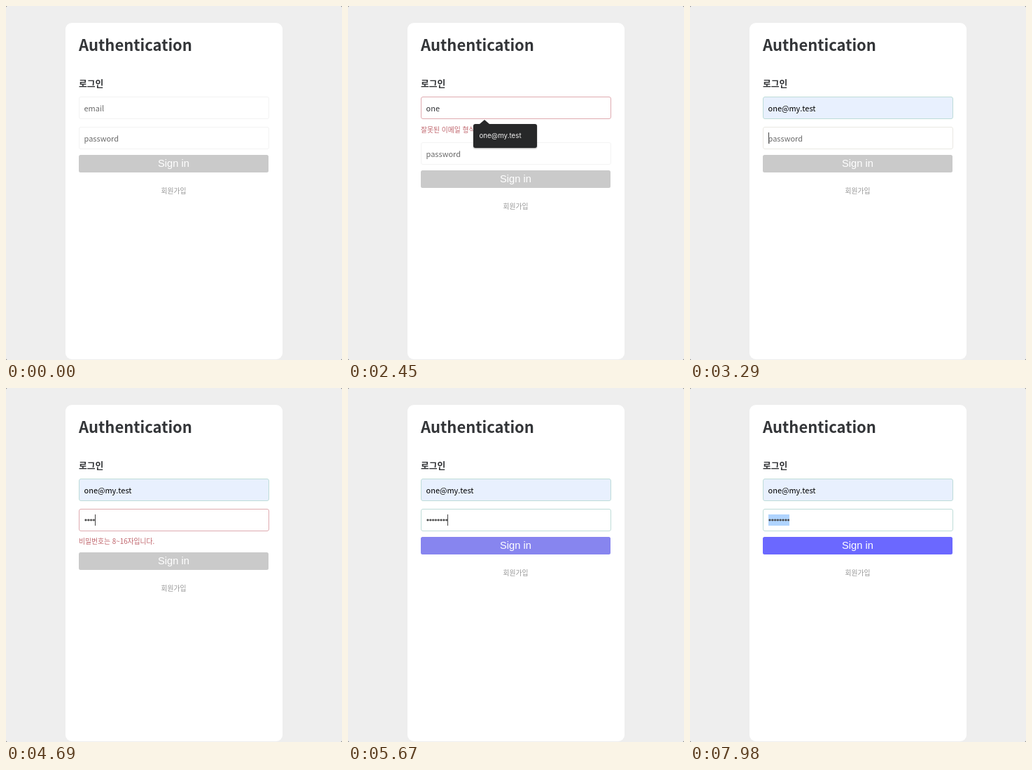
Write an HTML page that moves like this. It is 480 px wide and 504 px high and loops after 8 s.

```html
<!DOCTYPE html>
<html lang="ko">
<head>
<meta charset="utf-8">
<title>Authentication</title>
<style>
  html, body { margin: 0; width: 100%; height: 100%; overflow: hidden; background: #555; }
  .stage {
    position: relative; width: 480px; height: 504px; overflow: hidden;
    background: #eee; border-radius: 2px;
    font: 11px "Noto Sans CJK KR", "Noto Sans CJK", sans-serif; color: #333538;
  }
  .stage > *, .lower > * { position: absolute; box-sizing: border-box; white-space: pre; }
  .card { left: 84.5px; top: 24px; width: 310.5px; height: 478.5px; border-radius: 9px; background: #fff; }
  h1 { margin: 0; left: 104px; top: 38.4px; font-size: 22px; line-height: 32px; }
  h2 { margin: 0; left: 104px; top: 99.5px; font-size: 12.83px; line-height: 20px; }
  .lower { left: 0; top: 0; width: 480px; height: 0; }

  .field {
    display: flex; align-items: center; left: 104px; width: 272px; height: 32px;
    padding: 0 6.5px; border: 1px solid; border-radius: 3px; background: #fff;
  }
  #email { top: 129px; }
  #password { top: 172px; }
  .faint { border-color: #f3f3f3; }
  .plain { border-color: #e9e8e3; }
  .bad { border-color: #dfabb0; }
  .good { border-color: #bedcd8; }
  .filled { background: #e8f0fe; color: #000; }
  .hint { color: #6b6b6b; }
  .caret { width: 1px; height: 16px; margin-right: -1px; background: #444; }
  .dots {
    height: 16px;
    background: radial-gradient(circle, #444 1.2px, transparent 1.8px) 0 0 / 3.83px 16px repeat-x;
  }
  .dots.selected { background-color: #b0d4fe; }

  .error { left: 104px; font-size: 9.8px; line-height: 16px; color: #bf636a; }
  #emailError { top: 167.5px; }
  #passwordError { top: 210px; }
  #button {
    left: 104px; top: 212px; width: 271px; height: 25px; border-radius: 2.5px;
    font: 14.67px/25px "Liberation Sans", Arial, sans-serif; text-align: center; color: #fff;
  }
  .link { left: 104px; top: 255px; width: 271px; text-align: center; font-size: 9.8px; line-height: 16px; color: #969696; }

  #popup {
    left: 179px; top: 168px; width: 90.5px; height: 33.5px; padding: 4px 0; border-radius: 3px;
    background: #272829; box-shadow: 0 1px 2px rgba(0, 0, 0, .35);
    font: 9.75px/26px Inter, Roboto, sans-serif; color: #f2f2f2;
  }
  #popup::before {
    content: ""; position: absolute; left: 8.5px; top: -6px;
    border: 7.5px solid transparent; border-top: 0; border-bottom: 6.5px solid #272829;
  }
  #item { padding-left: 8.5px; }
  #item.hover { background: #434446; }
</style>
</head>
<body>
<div class="stage">
  <div class="card"></div>
  <h1>Authentication</h1>
  <h2>로그인</h2>
  <div id="email" class="field"><span class="value"></span><i class="caret"></i><span class="hint">email</span></div>
  <div id="emailError" class="error">잘못된 이메일 형식입니다.</div>
  <div class="lower" id="passwordRow">
    <div id="password" class="field"><span class="value dots"></span><i class="caret"></i><span class="hint">password</span></div>
    <div id="passwordError" class="error">비밀번호는 8~16자입니다.</div>
  </div>
  <div class="lower" id="actions">
    <div id="button">Sign in</div>
    <div class="link">회원가입</div>
  </div>
  <div id="popup"><div id="item"></div></div>
</div>
<script>
const LOOP = 8000, SHIFT = 22, DOT = 3.83;
const ADDRESS = "one@my.test";
const FADE_START = 5460, FADE_TIME = 500;
const GRAY = [202, 202, 202], VIOLET = [107, 104, 255];

// Each step changes part of the form's state.
const steps = [
  [0, { typed: 0, dots: 0, caret: "", popup: false, hover: false, filled: false, selected: false,
        email: "faint", password: "faint" }],
  [1120, { caret: "email" }],
  [1190, { popup: true }],
  [1540, { typed: 1, email: "bad" }],
  [1750, { typed: 2 }],
  [1960, { typed: 3 }],
  [2450, { caret: "" }],
  [2660, { typed: ADDRESS.length, filled: true, hover: true }],
  [2940, { popup: false, hover: false, caret: "email", email: "good", password: "plain" }],
  [3290, { caret: "password" }],
  [3640, { dots: 1, password: "bad" }],
  [4200, { dots: 2 }],
  [4480, { dots: 3 }],
  [4690, { dots: 4 }],
  [4900, { dots: 5 }],
  [5110, { dots: 6 }],
  [5250, { dots: 7 }],
  [5460, { dots: 8, password: "good" }],
  [5950, { caret: "" }],
  [6440, { caret: "password" }],
  [6860, { caret: "", selected: true }]
];

const $ = id => document.getElementById(id);
const show = (el, on) => { el.style.visibility = on ? "visible" : "hidden"; };
const drop = (el, on) => { el.style.top = (on ? SHIFT : 0) + "px"; };

function stateAt(t) {
  return Object.assign({}, ...steps.filter(([at]) => at <= t).map(([, change]) => change));
}

function drawField(name, look, empty, caret) {
  const el = $(name);
  el.className = "field " + look;
  show(el.querySelector(".hint"), empty);
  show(el.querySelector(".caret"), caret === name);
  return el.querySelector(".value");
}

function render(t) {
  const s = stateAt(t);
  const emailBad = s.email === "bad", passwordBad = s.password === "bad";

  const look = s.email + (s.filled ? " filled" : "");
  drawField("email", look, !s.typed, s.caret).textContent = ADDRESS.slice(0, s.typed);

  const dots = drawField("password", s.password, !s.dots, s.caret);
  dots.style.width = s.dots * DOT + "px";
  dots.classList.toggle("selected", s.selected);

  show($("emailError"), emailBad);
  show($("passwordError"), passwordBad);
  drop($("passwordRow"), emailBad);
  drop($("actions"), emailBad || passwordBad);

  show($("popup"), s.popup);
  $("item").classList.toggle("hover", s.hover);

  const p = Math.min(1, Math.max(0, (t - FADE_START) / FADE_TIME));
  const mix = 1 - (1 - p) ** 2.2;
  $("button").style.background = `rgb(${GRAY.map((c, i) => c + (VIOLET[i] - c) * mix)})`;
}

$("item").textContent = ADDRESS;
const start = performance.now();
function tick() {
  render((performance.now() - start) % LOOP);
  requestAnimationFrame(tick);
}
tick();
</script>
</body>
</html>
```
